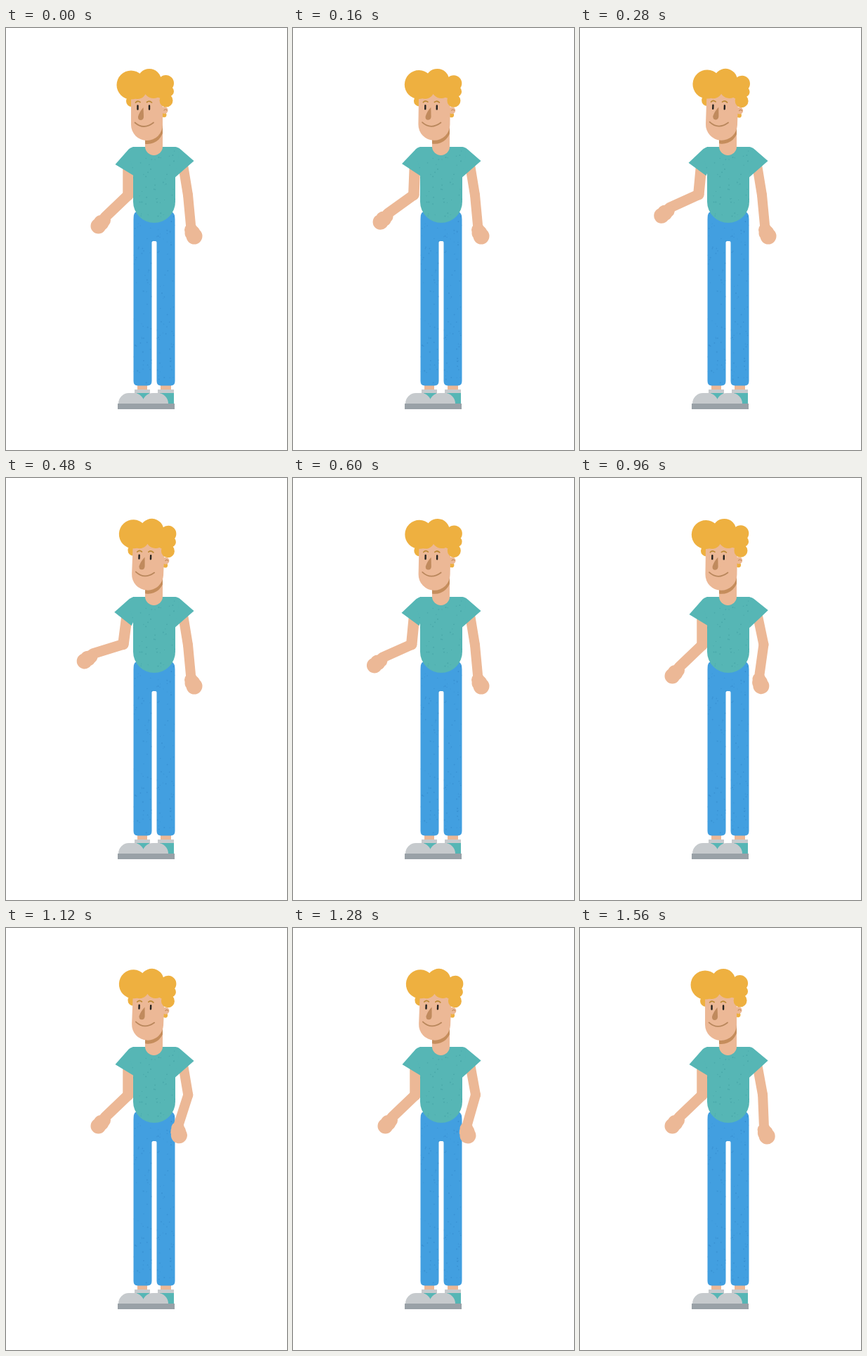
Recreate the animation shown at these times as an HTML page with a canvas. Size 400x600 px, loop 1.6 s.

```html
<!DOCTYPE html>
<html lang="en">
<head>
<meta charset="utf-8">
<title>Standing figure</title>
<style>
  html, body { margin: 0; height: 100%; overflow: hidden; background: #fff; }
  canvas { display: block; }
</style>
</head>
<body>
<canvas id="stage" width="400" height="600"></canvas>
<script>
const ctx = document.getElementById('stage').getContext('2d');
const LOOP = 1600;
const SKIN = '#ecb896', HAIR = '#eeb040', SHIRT = '#56b6b5', JEANS = '#429fe0';
const SHADE = '#c58d5c', LIGHT = '#c6cacd', SOLE = '#99a1a7';

const path = d => new Path2D(d);
const body = path('M181 169H241Q246 171 246 181L241 206V247A30 30 0 0 1 181 247V206L176 181Q176 171 181 169Z');
const leftSleeve = path('M183 169Q178 169 174.500 172.500L155.500 194L182 210L192 180Z');
const rightSleeve = path('M240 169Q245 169 248.500 172.500L267.500 189L240 213L230 180Z');
const jeans = path('M184 262H237Q240.500 264 240.500 272V502Q240.500 508.500 234.500 508.500H220.500Q214.500 508.500 214.500 502V305Q214.500 303 212.500 303H209.500Q207.500 303 207.500 305V502Q207.500 508.500 201.500 508.500H187.500Q181.500 508.500 181.500 502V272Q181.500 264 184 262Z');
const neck = path('M198 135H223V168.500A12.500 12.500 0 0 1 198 168.500Z');
const face = path('M178 92H223V137.500A22.500 22.500 0 0 1 178 137.500Z');
const nose = path('M195.500 113Q190 119 188 126Q187.500 131 192 131Q196 130.500 196 126Z');
const toe = path('M160 534A15 15 0 0 1 175 519H182A15 15 0 0 1 197 534Z');

const hairBack = [[179, 104, 8], [225, 123.500, 3.500]];
const hairFront = [[178, 81, 20.500], [204, 75, 17], [227.500, 78.500, 11.500], [231.500, 90, 7.500],
                   [228, 103, 9.500], [187, 88, 13], [210, 86, 14], [221, 90, 10]];

function fill(shape, color) {
  ctx.fillStyle = color;
  ctx.fill(shape);
}

function rect(x, y, w, h, color) {
  ctx.fillStyle = color;
  ctx.fillRect(x, y, w, h);
}

function circles(list, color) {
  const shape = new Path2D();
  for (const [x, y, r] of list) {
    shape.moveTo(x + r, y);
    shape.arc(x, y, r, 0, 7);
  }
  fill(shape, color);
}

function stroke(d, width, color) {
  ctx.lineWidth = width;
  ctx.strokeStyle = color;
  ctx.lineCap = 'round';
  ctx.stroke(path(d));
}

// Draw inside a frame rotated by some degrees around a pivot.
function turned(degrees, x, y, draw) {
  ctx.save();
  ctx.translate(x, y);
  ctx.rotate(degrees * Math.PI / 180);
  ctx.translate(-x, -y);
  draw();
  ctx.restore();
}

// Faint fixed grain on the fabric.
function grain(shape, color, x, y, w, h, count) {
  let seed = 7;
  const random = () => (seed = seed * 16807 % 2147483647) / 2147483647;
  ctx.save();
  ctx.clip(shape);
  ctx.globalAlpha = 0.3;
  for (let i = 0; i < count; i++) {
    circles([[x + random() * w, y + random() * h, 0.5 + random() * 0.6]], color);
  }
  ctx.restore();
}

// Smooth rise from start to peak, then smooth fall to end.
function swing(t, start, peak, end) {
  if (t <= start || t >= end) return 0;
  const u = t < peak ? (t - start) / (peak - start) : (end - t) / (end - peak);
  return Math.sin(u * Math.PI / 2) ** 2;
}

function drawLegs() {
  rect(187, 506, 14, 10, SKIN);
  rect(220, 506, 15, 10, SKIN);
  rect(183, 514, 22, 6, LIGHT);
  rect(216, 514, 23, 6, LIGHT);
  rect(186, 519, 18, 15, SHIRT);
  rect(219, 519, 20, 15, SHIRT);
  fill(toe, LIGHT);
  ctx.save();
  ctx.translate(34, 0);
  fill(toe, LIGHT);
  ctx.restore();
  rect(159, 534, 81, 8, SOLE);
  fill(jeans, JEANS);
  grain(jeans, '#2878b8', 181, 262, 60, 246, 150);
}

function drawLeftArm(p) {
  turned(7.5 * p, 179, 182, () => {
    stroke('M174 195V237.500', 15.5, SKIN);
    turned(19.5 * p, 174, 237.5, () => {
      stroke('M174 237.500L141 269', 15, SKIN);
      turned(-16 * p, 141, 269, () =>
        circles([[131.5, 281.5, 11], [135.5, 277, 11], [139.5, 273.5, 9.5]], SKIN));
    });
  });
}

function drawRightArm(q) {
  turned(-10 * q * (1 - q), 243, 180, () => {
    stroke('M252.500 198L259 237.500', 14, SKIN);
    turned(24 * q + 10 * q * (1 - q), 259, 237.5, () => {
      stroke('M259 237.500L263 280', 14, SKIN);
      turned(-7 * q, 263, 280, () =>
        circles([[268, 296, 11.5], [265.5, 291.5, 11], [263.5, 287, 9.5]], SKIN));
    });
  });
}

function drawHead(tilt) {
  fill(neck, SKIN);
  ctx.save();
  ctx.clip(neck);
  turned(tilt, 210, 165, () => {
    ctx.translate(1, 5);
    fill(face, SHADE);
  });
  ctx.restore();

  turned(tilt, 210, 165, () => {
    circles(hairBack, HAIR);
    circles([[225.5, 117, 5]], SKIN);
    stroke('M225 117Q227 114.500 229 117', 1.2, SHADE);
    fill(face, SKIN);
    circles(hairFront, HAIR);
    fill(nose, '#c08a5d');
    stroke('M187.500 110.500V115.500M204 110.500V115.500', 2.4, '#252220');
    stroke('M184.500 106Q187.500 102.500 191 105.500M200.500 105.500Q204 102.500 207.500 106', 1.7, '#bd8a35');
    stroke('M183.500 134.500Q196 145.500 210 134.500', 1.7, '#b9875c');
  });
}

function draw(t) {
  const left = swing(t, 0, 440, 900);
  const right = swing(t, 720, 1170, 1680);
  const nod = Math.sin(Math.PI * t / 800) ** 2;
  rect(0, 0, 400, 600, '#fff');
  drawLegs();
  drawLeftArm(left);
  drawRightArm(right);
  turned(7 * left, 181, 182, () => fill(leftSleeve, SHIRT));
  turned(-10 * right * (1 - right), 243, 182, () => fill(rightSleeve, SHIRT));
  fill(body, SHIRT);
  grain(body, '#2f8c92', 176, 169, 70, 108, 65);
  drawHead(2.5 * nod);
}

function tick(now) {
  draw(now % LOOP);
  requestAnimationFrame(tick);
}
requestAnimationFrame(tick);
</script>
</body>
</html>
```
